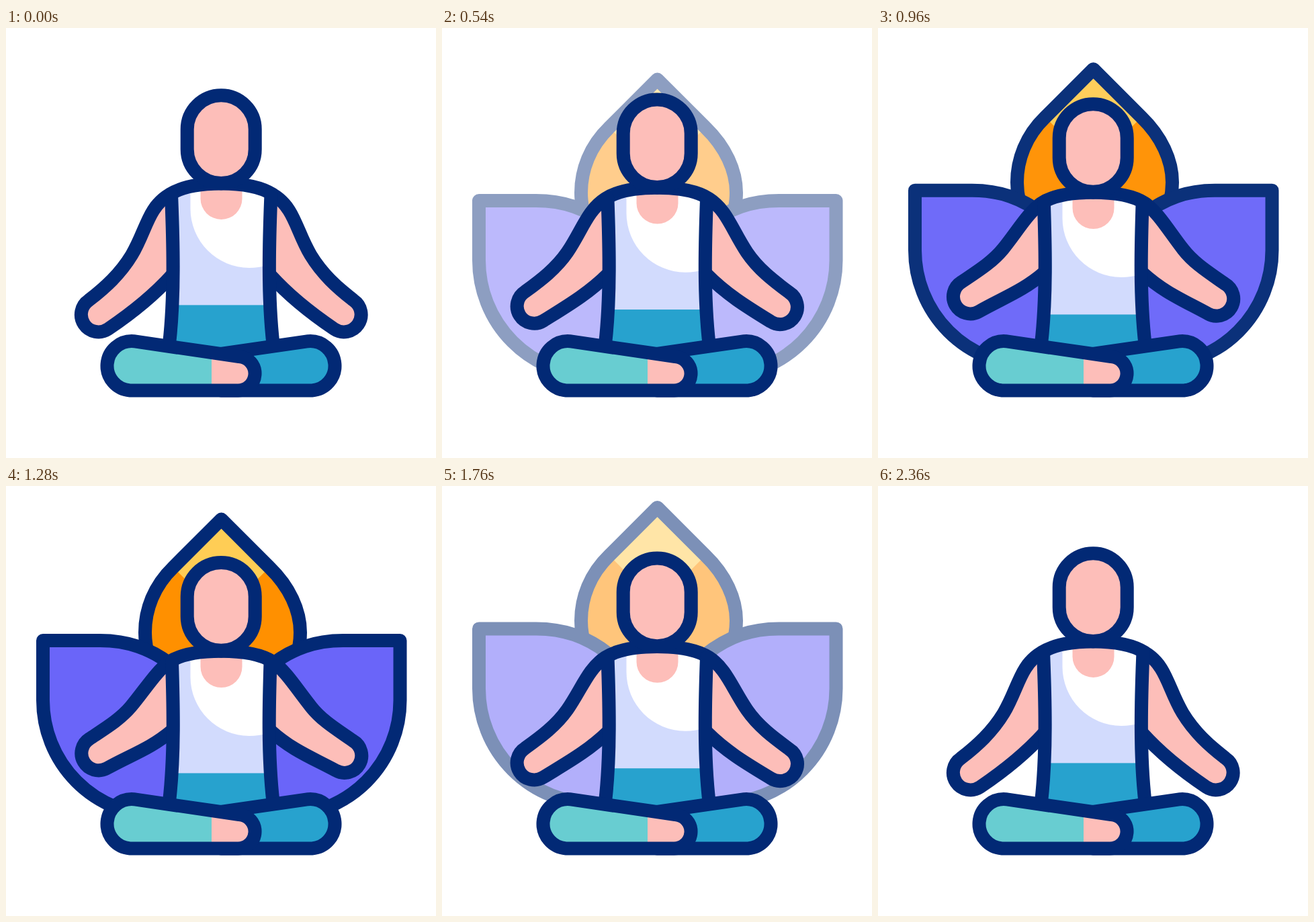
Animation of 640x640 px, one loop 2400 ms. Source, as an HTML page:

```html
<!DOCTYPE html>
<html lang="en">
<head>
<meta charset="utf-8">
<title>Meditation</title>
<style>
  html, body { margin: 0; width: 100%; height: 100%; overflow: hidden; background: #fff; }
  svg { display: block; width: 100%; height: 100%; }
  .line { fill: none; stroke: #022975; stroke-width: 20; stroke-linecap: round; stroke-linejoin: round; }
  .skin { fill: #fdbeb9; }
  .blue { fill: #27a2ce; }
  .teal { fill: #68cdd1; }
  .vest { fill: #d2dbfd; }
  .gold { fill: #ffcd55; }
  .orange { fill: #ff9000; }
  .violet { fill: #6a65f9; }
</style>
</head>
<body>
<svg viewBox="0 0 640 640">
  <defs>
    <path id="petal" d="M140 230C180 230 215 241 250 269L300 330V490H226A171 171 0 0 1 55 319V230Z"/>
    <path id="core" d="M320.5 49.5L249 121C220 149 207 184 207 218Q207 238 214 260L250 300H391L431 260Q438 238 438 218C438 185 422 150 392 121Z"/>
    <path id="leftArm"/>
    <path id="rightArm"/>
    <path id="side"/>
    <path id="half"/>
    <path id="rightLeg" d="M455.5 539.5A36.75 36.75 0 0 0 450 466.2L320 484.8V539.5Z"/>
    <path id="leftLeg" d="M184.5 539.5A36.75 36.75 0 0 1 190 466.2L347 489A25.3 25.3 0 0 1 343.5 539.5Z"/>
    <clipPath id="torso">
      <use href="#half"/>
      <use href="#half" transform="matrix(-1 0 0 1 640.5 0)"/>
    </clipPath>
  </defs>

  <g id="lotus">
    <use href="#core" class="orange"/>
    <path class="gold" d="M320.5 49.5L249 121L320.5 192.5L392 121Z"/>
    <use href="#core" class="line"/>
    <g id="petals">
      <use href="#petal" class="violet"/>
      <use href="#petal" class="line"/>
    </g>
    <use href="#petals" transform="matrix(-1 0 0 1 641.5 0)"/>
  </g>

  <use href="#leftArm" class="skin"/>
  <use href="#rightArm" class="skin" transform="matrix(-1 0 0 1 640.5 0)"/>

  <g clip-path="url(#torso)">
    <rect class="vest" x="230" y="220" width="180" height="270"/>
    <g id="clothes">
      <path fill="#fff" d="M274.5 215V269A88 88 0 0 0 362 357Q376 357 400 351V215Z"/>
      <path class="skin" d="M289.5 215V254A31 31 0 0 0 351.5 254V215Z"/>
      <rect class="blue" x="230" y="412.4" width="180" height="90"/>
    </g>
  </g>

  <g class="line">
    <use href="#leftArm"/>
    <use href="#side"/>
    <g transform="matrix(-1 0 0 1 640.5 0)">
      <use href="#rightArm"/>
      <use href="#side"/>
    </g>
  </g>

  <g id="head">
    <rect class="skin" x="269.7" y="100.3" width="101" height="130.7" rx="50.5"/>
    <rect class="line" x="269.7" y="100.3" width="101" height="130.7" rx="50.5"/>
  </g>

  <use href="#rightLeg" class="blue"/>
  <use href="#rightLeg" class="line"/>
  <use href="#leftLeg" class="teal"/>
  <path class="skin" d="M306 483L347 489A25.3 25.3 0 0 1 343.5 539.5H306Z"/>
  <use href="#leftLeg" class="line"/>
</svg>
<script>
const LOOP = 2400, BREATH = 2360;
const $ = id => document.getElementById(id);
const clamp = x => Math.min(1, Math.max(0, x));
const smooth = x => x * x * (3 - 2 * x);
const moveY = (id, y) => $(id).setAttribute("transform", `translate(0 ${y})`);

// Each path blends between its exhaled and inhaled pose; the right arm lifts a little less.
const armDown = "M320.25 231.5C288 231.5 260 237 243 248C211 267 209 301 187 338C170 366 148 386 123.3 405.2A25.5 25.5 0 0 0 152 448C189 423 219 399 247 368";
const poses = {
  leftArm: [
    armDown,
    "M320.25 246C288 246 260 251 243 262C224 276 207 303 186 328C170 347 148 360 124.1 375.8A25.5 25.5 0 0 0 149.6 419.9C185 400 215 391 247 364"
  ],
  rightArm: [
    armDown,
    "M320.25 246C288 246 260 251 243 262C224 276 207 303 186 329C170 349 148 362 124 378.8A25.5 25.5 0 0 0 149.5 423C185 404 215 393 247 364"
  ],
  side: [
    "M246 247C249 320 251 400 243 470",
    "M247 262C249 325 251 400 243 470"
  ],
  half: [
    "M246 247C249 320 251 400 243 470V490H330V231.5H320C290 231.5 262 236 246 247Z",
    "M247 262C249 325 251 400 243 470V490H330V246H320C290 246 262 251 247 262Z"
  ]
};

function blend([from, to], k) {
  const ends = to.match(/[\d.]+/g);
  let i = 0;
  return from.replace(/[\d.]+/g, n => +n + (ends[i++] - n) * k);
}

function draw(now) {
  const t = now % LOOP;
  const breath = (1 - Math.cos(2 * Math.PI * Math.min(1, t / BREATH))) / 2;

  for (const id in poses) $(id).setAttribute("d", blend(poses[id], breath));
  moveY("head", 14 * breath);
  moveY("clothes", 15.3 * breath);

  const fadeIn = smooth(1 - (1 - clamp((t - 200) / 1000)) ** 1.5);
  const fadeOut = smooth(clamp((2010 - t) / 490));
  $("lotus").setAttribute("opacity", fadeIn * fadeOut);
  moveY("lotus", (1280 - t) * 0.0366);

  requestAnimationFrame(draw);
}
requestAnimationFrame(draw);
</script>
</body>
</html>
```
